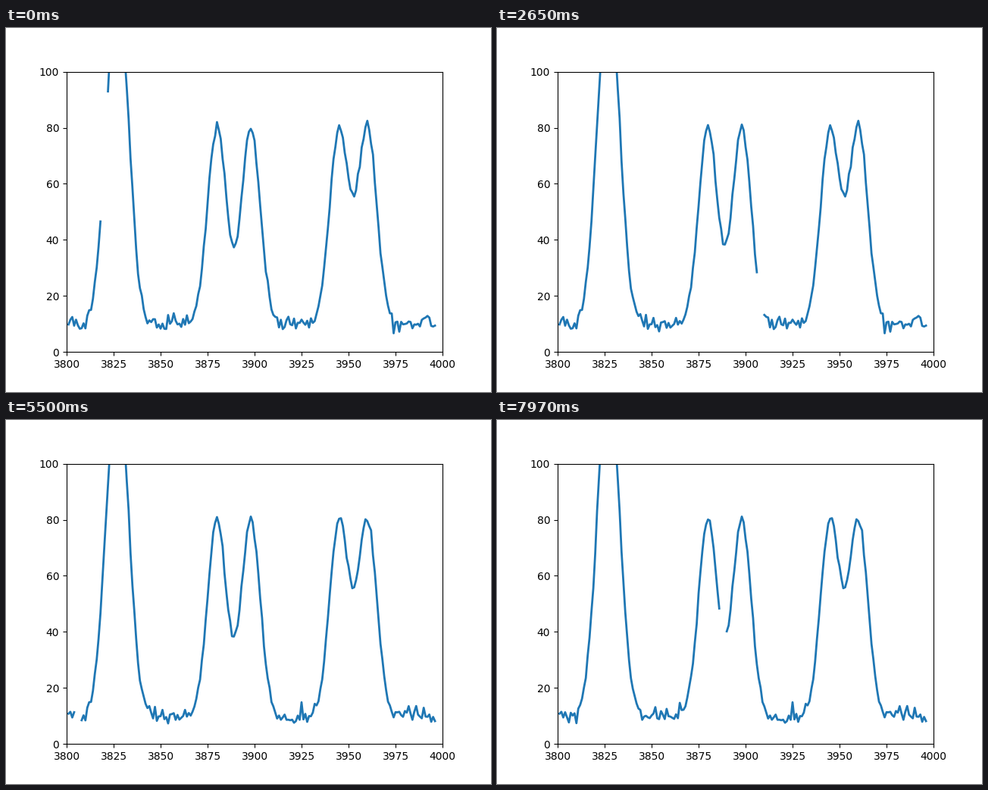
A matplotlib script for the animation above (8 s loop, 640 by 480 pixels).

```python
import numpy as np
import matplotlib.pyplot as plt
from matplotlib.animation import FuncAnimation

LOOP_MS, INTERVAL = 8000, 20
FRAMES = LOOP_MS // INTERVAL
STEPS = 266            # samples written per loop
SLOTS, GAP = 197, 3    # sweep length, blank samples ahead of the head
START = 18             # head position at time zero

FLOOR, HEIGHT, WIDTH = 10, 70, 5
CENTRES = (24.2, 29.8, 80, 98, 145, 160)

slot = np.arange(SLOTS)
peaks = sum(HEIGHT * np.exp(-((slot - c) / WIDTH) ** 2 / 2) for c in CENTRES)


def sweep(rng):
    """One noisy pass over the spectrum; the jitter is strongest on the floor."""
    noise = rng.normal(0, 1, SLOTS) * np.where(peaks < 3, 1.5, 0.8)
    y = FLOOR + peaks + noise
    y[0] = np.nan
    return y


rng = np.random.default_rng(8)
sweeps = np.array([sweep(rng) for _ in range(3)])

fig, ax = plt.subplots(figsize=(6.4, 4.8), dpi=100)
ax.set_xlim(3800, 4000)
ax.set_ylim(0, 100)
trace, = ax.plot([], [], color="#1f77b4", lw=2)


def update(n):
    t = (n + 0.5) * INTERVAL
    head = START + int(t * STEPS / LOOP_MS)
    # Slots the head has passed show the newer sweep, the rest the one before.
    y = sweeps[(head - slot) // SLOTS + 1, slot]
    y[(slot - head - 1) % SLOTS < GAP] = np.nan
    trace.set_data(3800 + slot, y)
    return trace,


anim = FuncAnimation(fig, update, frames=FRAMES, interval=INTERVAL,
                     repeat=True, repeat_delay=0, blit=False)
plt.show()
```
